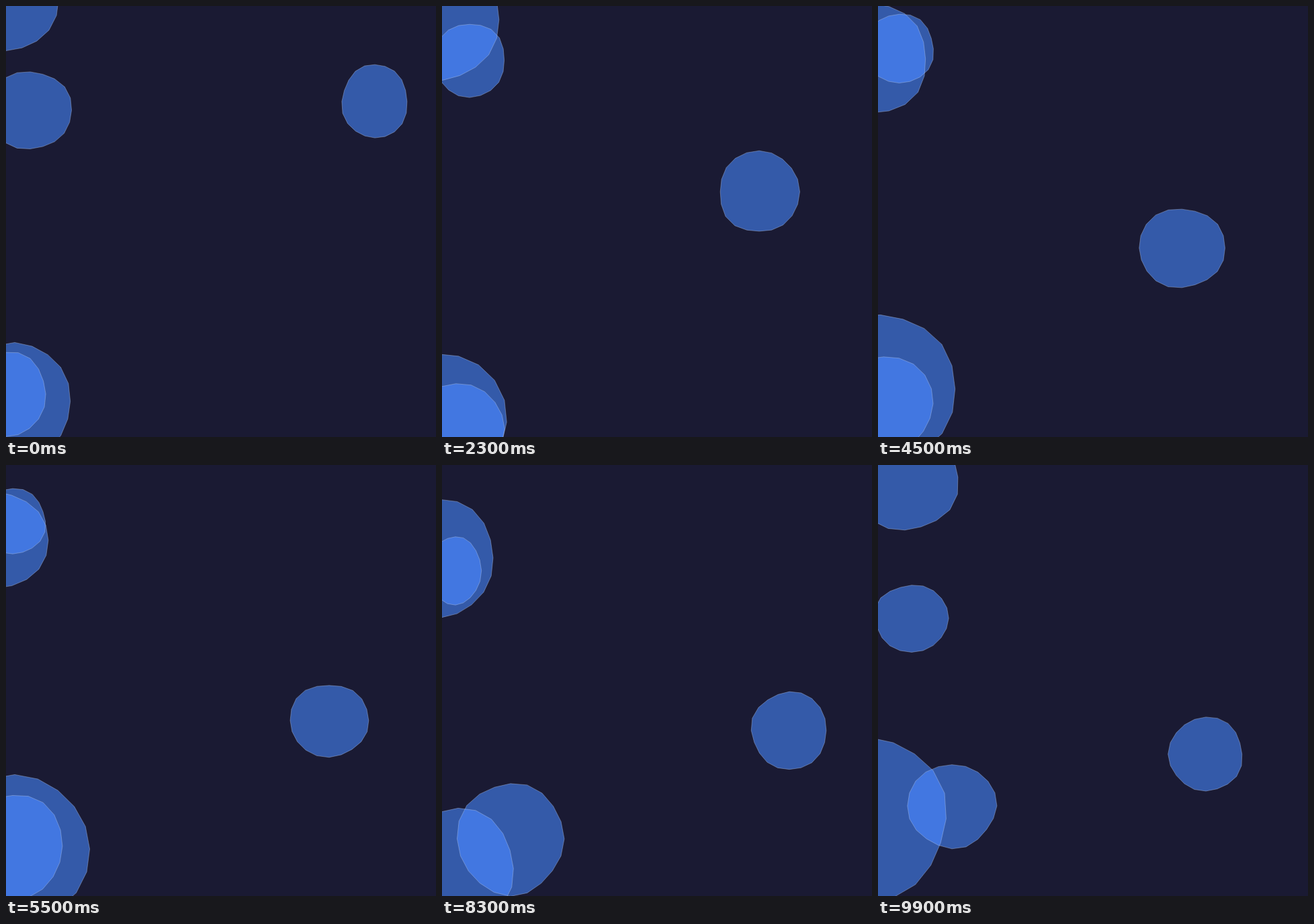
An HTML page with a canvas for the animation above (10000 ms loop, 640 by 641 pixels).

```html
<!DOCTYPE html>
<html lang="en">
<head>
<meta charset="utf-8">
<title>Drifting blobs</title>
<style>
html, body { margin: 0; width: 100%; height: 100%; overflow: hidden; background: #1a1a33; }
canvas { display: block; width: 100vw; height: 100vh; }
</style>
</head>
<body>
<canvas id="stage" width="640" height="641"></canvas>
<script>
const ctx = document.getElementById('stage').getContext('2d');
const LOOP = 10000, STEP = 100, CORNERS = 20;
const BACK = '#1a1a33', FILL = '#345aa9', OVERLAP = '#4277e1';
const EDGE = 'rgba(190,205,235,0.38)';

let seed = 7;
function random() {
  seed = (seed * 16807) % 2147483647;
  return seed / 2147483647;
}

// Waypoints of a drifting blob: centre x, y and half width, half height.
const times = [0, 1100, 3400, 5500, 7000, 8300, 9900];

function makeBlob(...path) {
  const ripples = [3, 4, 5].map(n => ({
    n, size: 0.05 / n, phase: random() * 2 * Math.PI, speed: (random() - 0.5) * 0.003
  }));
  return { path, ripples };
}

const topLarge = makeBlob(
  [0, -10, 78, 77], [0, -2, 81, 80], [0, 46, 86, 93], [-15, 112, 78, 72],
  [-1, 167, 81, 84], [-2, 138, 79, 87], [40, 18, 80, 80]);
const topSmall = makeBlob(
  [36, 155, 62, 58], [26, 116, 52, 56], [50, 60, 55, 54], [10, 84, 49, 49],
  [-2, 159, 50, 44], [20, 157, 38, 51], [50, 228, 55, 50]);
const lowLarge = makeBlob(
  [13, 588, 84, 86], [2, 655, 95, 94], [-10, 578, 109, 111], [13, 571, 111, 109],
  [-18, 578, 100, 102], [24, 600, 83, 89], [-12, 526, 114, 120]);
const lowSmall = makeBlob(
  [-1, 577, 61, 63], [26, 621, 71, 72], [12, 622, 72, 64], [10, 567, 75, 78],
  [33, 596, 66, 70], [102, 556, 79, 83], [110, 507, 66, 62]);
const loner = makeBlob(
  [549, 142, 49, 55], [524, 219, 50, 55], [438, 320, 67, 64], [481, 380, 59, 54],
  [521, 338, 49, 58], [517, 395, 56, 58], [488, 430, 55, 55]);

// Smooth curve through the waypoints, component by component.
function along(path, t) {
  const last = times.length - 1;
  let i = 0;
  while (i < last - 1 && t >= times[i + 1]) i++;
  const span = times[i + 1] - times[i];
  const u = (t - times[i]) / span, u2 = u * u, u3 = u2 * u;
  const slope = (k, c) => {
    const a = Math.max(k - 1, 0), b = Math.min(k + 1, last);
    return (path[b][c] - path[a][c]) / (times[b] - times[a]) * span;
  };
  return path[i].map((p, c) =>
    (2 * u3 - 3 * u2 + 1) * p + (u3 - 2 * u2 + u) * slope(i, c) +
    (3 * u2 - 2 * u3) * path[i + 1][c] + (u3 - u2) * slope(i + 1, c));
}

function outline(blob, t) {
  const [x, y, rx, ry] = along(blob.path, t);
  const shape = new Path2D();
  for (let k = 0; k < CORNERS; k++) {
    const a = k / CORNERS * 2 * Math.PI;
    const swell = blob.ripples.reduce(
      (sum, r) => sum + r.size * Math.sin(r.n * a + r.phase + r.speed * t), 1);
    shape.lineTo(x + rx * swell * Math.cos(a), y + ry * swell * Math.sin(a));
  }
  shape.closePath();
  return shape;
}

function fill(shape, color) {
  ctx.fillStyle = color;
  ctx.fill(shape);
}

function drawPair(a, b) {
  fill(a, FILL);
  fill(b, FILL);
  ctx.save();
  ctx.clip(a);
  fill(b, OVERLAP);
  ctx.restore();
  ctx.stroke(a);
  ctx.stroke(b);
}

function draw(t) {
  ctx.fillStyle = BACK;
  ctx.fillRect(0, 0, 640, 641);
  ctx.strokeStyle = EDGE;
  ctx.lineWidth = 1;
  drawPair(outline(topLarge, t), outline(topSmall, t));
  drawPair(outline(lowLarge, t), outline(lowSmall, t));
  const single = outline(loner, t);
  fill(single, FILL);
  ctx.stroke(single);
}

function tick() {
  const t = performance.now() % LOOP;
  draw(Math.floor(t / STEP) * STEP);
  requestAnimationFrame(tick);
}
tick();
</script>
</body>
</html>
```
